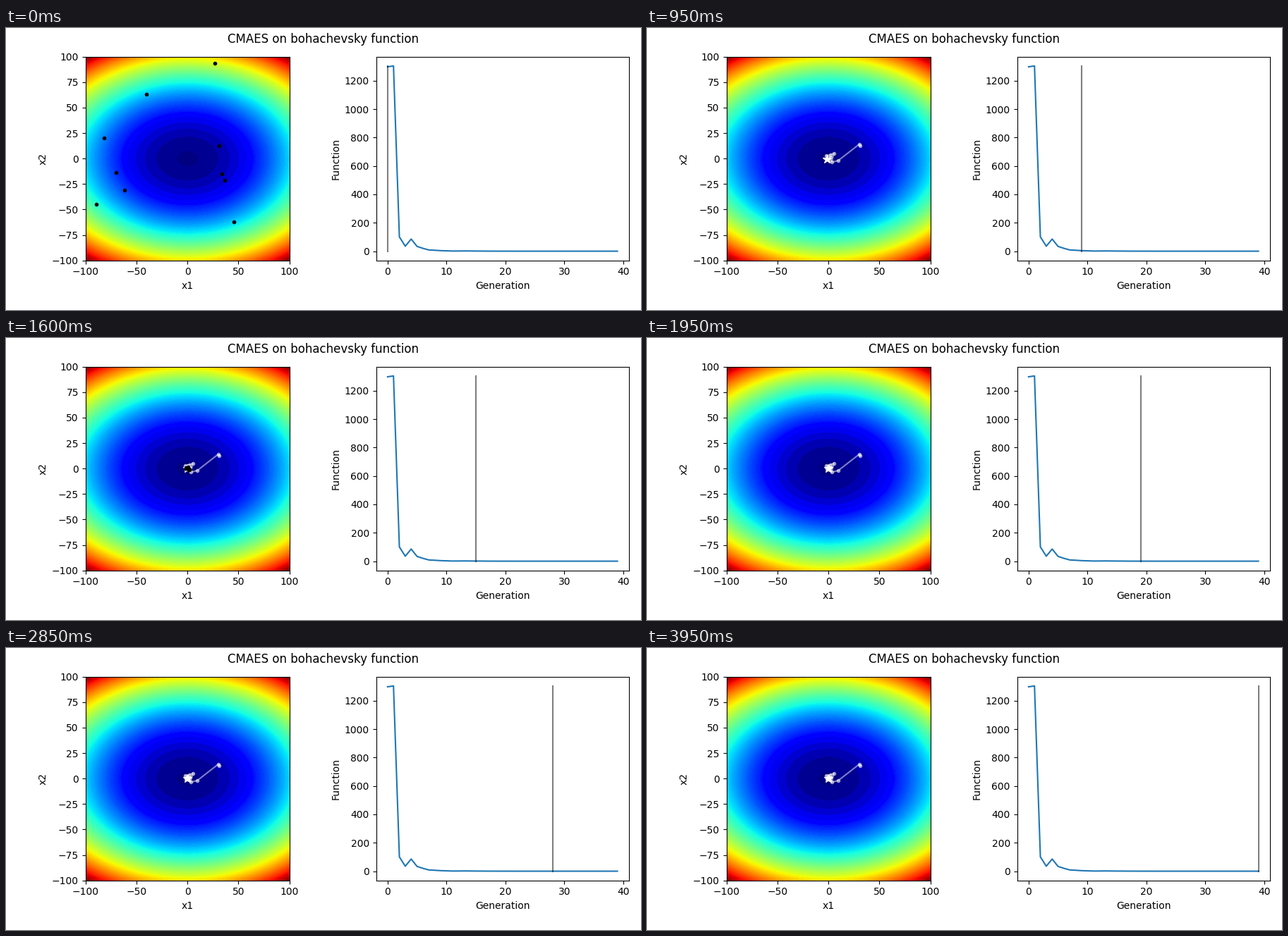
These frames come from a looping animation (900x400 px, 4 s). A matplotlib script:

```python
import numpy as np
import matplotlib.pyplot as plt
from matplotlib.animation import FuncAnimation

W, H, DPI = 900, 400, 100
GENERATIONS = 40
POPSIZE = 10


def bohachevsky(x, y):
    return (x**2 + 2 * y**2 - 0.3 * np.cos(3 * np.pi * x)
            - 0.4 * np.cos(4 * np.pi * y) + 0.7)


def best_path():
    """Best point per generation: a few long jumps, then a shrinking spiral."""
    jumps = [(31.4, 12.5), (30.2, 14), (9.6, -2), (3.2, -3.5), (5.5, 5.2), (2, 3.8)]
    k = np.arange(GENERATIONS - len(jumps))
    r, angle = 3.4 * np.exp(-0.3 * k), 2.2 + 4.7 * k
    spiral = np.column_stack([r * np.cos(angle), r * np.sin(angle)])
    return np.vstack([jumps, spiral])


def populations(path):
    """A wide start, then clouds around the optimum with a shrinking spread."""
    start = [(27, 93.5), (-40, 63), (-82, 20), (-70, -13.5), (-62, -31),
             (-89.5, -45), (34, -15), (36.5, -21.5), (45.5, -62)]
    rng = np.random.default_rng(4)
    pops = [np.vstack([path[:1], start])]
    for k in range(1, GENERATIONS):
        sigma = 55 * np.exp(-0.235 * k)
        cloud = rng.normal(0, sigma, (POPSIZE - 1, 2))
        reach = min(1.8 * sigma, 90)
        pops.append(np.vstack([path[k], cloud.clip(-reach, reach)]))
    return pops


def add_axes(fig, left, right, bottom=70.31, top=359.31):
    return fig.add_axes([left / W, bottom / H,
                         (right - left) / W, (top - bottom) / H])


path = best_path()
pops = populations(path)
cost = bohachevsky(*path.T)

fig = plt.figure(figsize=(W / DPI, H / DPI), dpi=DPI, facecolor="white")
fig.suptitle("CMAES on bohachevsky function", y=0.9825, fontsize=12)

# Search space: coarse bands in the dark centre, fine ones outside
ax1 = add_axes(fig, 112.6, 401.6)
u = np.linspace(-100, 100, 201)
X, Y = np.meshgrid(u, u)
levels = np.r_[-1, np.arange(116, 4256, 828), np.arange(4256, 30400, 300)]
ax1.contourf(X, Y, X**2 + 2 * Y**2, levels=levels, cmap="jet",
             vmin=0, vmax=30000)
ax1.set(xlim=(-100, 100), ylim=(-100, 100), xlabel="x1", ylabel="x2",
        xticks=range(-100, 101, 50), yticks=range(-100, 101, 25))

trail, = ax1.plot([], [], "-o", color="white", ms=3, alpha=0.5, zorder=3)
star, = ax1.plot([], [], "*", color="white", ms=9, zorder=4)
dots, = ax1.plot([], [], "o", color="black", ms=3, zorder=5)

# Convergence curve
ax2 = add_axes(fig, 524.55, 882.85)
ax2.plot(np.arange(GENERATIONS), cost)
ax2.set(xlabel="Generation", ylabel="Function")
cursor, = ax2.plot([0, 0], [cost.min(), cost.max()], color="black",
                   alpha=0.5, zorder=3)


def update(i):
    """Even steps show the new population, odd steps move on to its best."""
    gen, settled = divmod(i, 2)
    done = gen + settled
    last = max(done - 1, 0)
    trail.set_data(*path[:done].T)
    star.set_data(*path[last:done].T)
    dots.set_data(*pops[gen].T)
    dots.set_visible(not settled)
    cursor.set_xdata([last, last])
    return trail, star, dots, cursor


anim = FuncAnimation(fig, update, frames=2 * GENERATIONS, interval=50,
                     init_func=lambda: update(0), repeat=True, repeat_delay=0)
plt.show()
```
